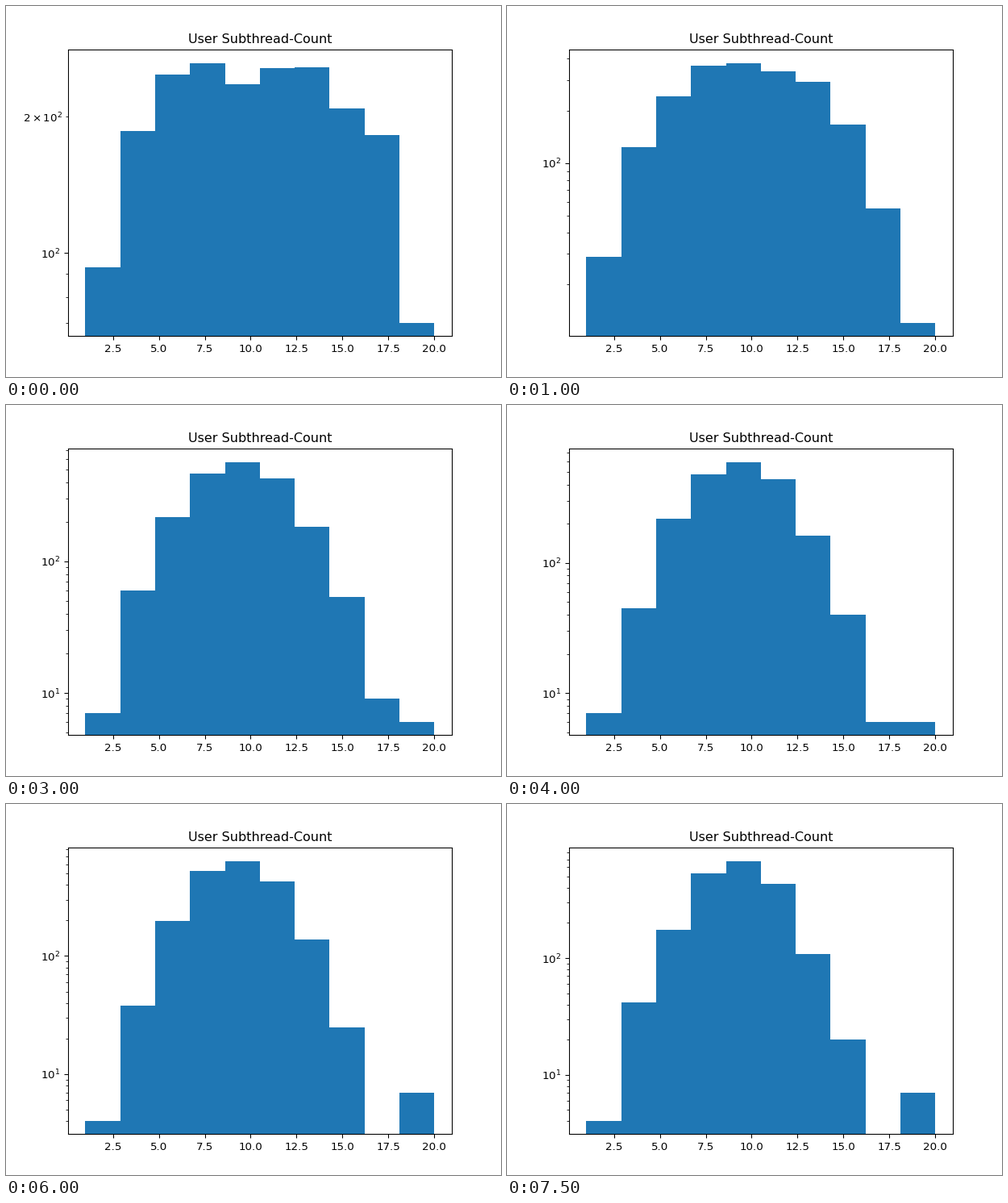
Recreate the animation shown at these times as a matplotlib script. Size 614 by 460 pixels, loop 8 s.

```python
import matplotlib.pyplot as plt
import numpy as np
from matplotlib.animation import FuncAnimation

W, H, DPI = 614, 460, 96
USERS = 2000
TOP = 20
BINS = 10
PEAK = 4  # this bin takes whatever the other nine leave over

# Users per bin at each step, without the peak bin
SIDES = np.array([
    [93, 186, 248, 263, 256, 257, 209, 182, 70],
    [15, 95, 200, 290, 315, 300, 235, 145, 75],
    [29, 123, 242, 364, 338, 293, 167, 55, 12],
    [18, 100, 232, 400, 380, 262, 130, 32, 6],
    [10, 86, 219, 432, 415, 227, 100, 17, 6],
    [8, 70, 219, 450, 423, 205, 76, 13, 6],
    [7, 60, 218, 464, 430, 182, 54, 9, 6],
    [7, 52, 219, 472, 436, 174, 46, 4, 6],
    [7, 45, 218, 480, 440, 162, 40, 6, 6],
    [6, 41, 207, 486, 434, 156, 35, 3, 7],
    [4, 40, 201, 498, 432, 148, 29, 0, 7],
    [3, 38, 196, 507, 432, 145, 26, 2, 7],
    [4, 38, 197, 523, 429, 139, 25, 0, 7],
    [4, 38, 190, 530, 420, 124, 24, 1, 8],
    [4, 38, 185, 538, 414, 118, 24, 1, 7],
    [4, 42, 175, 531, 433, 108, 20, 0, 7],
])
COUNTS = np.insert(SIDES, PEAK, USERS - SIDES.sum(axis=1), axis=1)

fig, ax = plt.subplots(figsize=(W / DPI, H / DPI), dpi=DPI)
fig.subplots_adjust(left=76.8 / W, right=552.96 / W,
                    bottom=50.688 / H, top=405.504 / H)
ax.set_title("User Subthread-Count")
bars = ax.bar(np.arange(BINS), COUNTS[0], width=1, align="edge",
              color="tab:blue", log=True)


def update(step):
    counts = COUNTS[step]
    low = 0 if step == 1 else 1  # some users briefly drop to zero
    width = (TOP - low) / BINS
    for i, (bar, count) in enumerate(zip(bars, counts)):
        bar.set(x=low + i * width, width=width, height=count)

    pad = 0.05 * (TOP - low)
    ax.set_xlim(low - pad, TOP + pad)
    least, most = counts[counts > 0].min(), counts.max()
    ratio = (most / least) ** 0.05
    ax.set_ylim(least / ratio, most * ratio)
    return bars.patches


anim = FuncAnimation(fig, update, frames=len(COUNTS), interval=500,
                     repeat=True, repeat_delay=0, blit=False)
plt.show()
```
